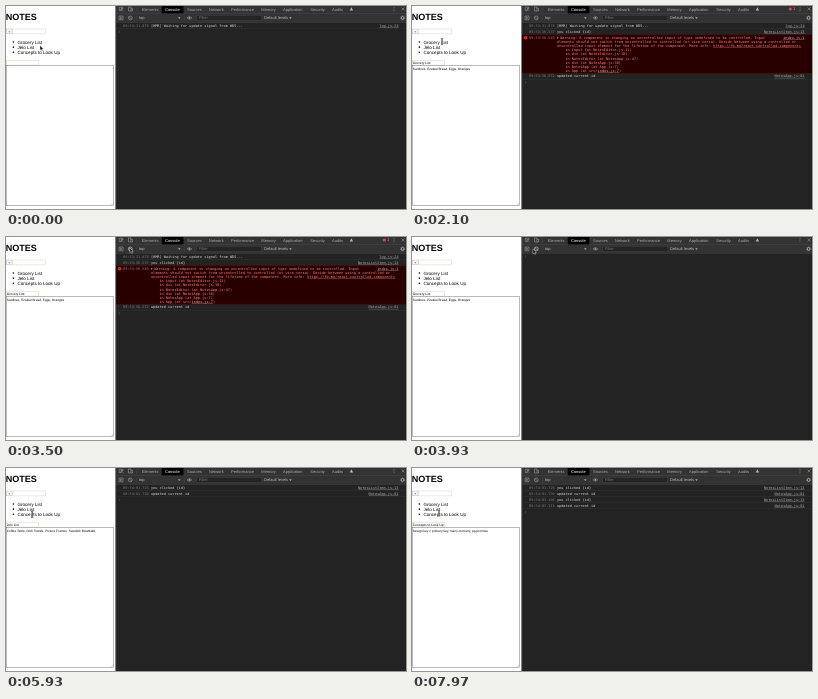
These frames come from a looping animation (400x203 px, 8 s). An HTML page:

```html
<!DOCTYPE html>
<html lang="en">
<head>
<meta charset="utf-8">
<title>Notes</title>
<style>
html, body { margin: 0; width: 100%; height: 100%; overflow: hidden; background: #fff; }
svg { display: block; width: 100vw; height: 100vh; }
text { font-family: "Liberation Sans", Arial, sans-serif; text-rendering: geometricPrecision; white-space: pre; }
.mono { font-family: "DejaVu Sans Mono", Menlo, monospace; font-size: 3.56px; }
</style>
</head>
<body>
<svg id="stage" viewBox="0 0 400 203" preserveAspectRatio="none"></svg>
<script>
const LOOP = 8000;
const CHAR = 2.143;
const stage = document.getElementById('stage');

function add(tag, attrs, parent = stage) {
  const node = document.createElementNS('http://www.w3.org/2000/svg', tag);
  for (const key in attrs) node.setAttribute(key, attrs[key]);
  parent.append(node);
  return node;
}
const group = () => add('g', {});
const rect = (x, y, width, height, fill, parent, more) =>
  add('rect', { x, y, width, height, fill, ...more }, parent);
const path = (d, stroke, parent, width = 0.5, fill = 'none') =>
  add('path', { d, stroke, fill, 'stroke-width': width }, parent);
function label(x, y, str, size, fill, parent, more) {
  const node = add('text', { x, y, 'font-size': size, fill, ...more }, parent);
  node.textContent = str;
  return node;
}
const mono = (x, y, str, fill, parent) => label(x, y, str, 3.56, fill, parent, { class: 'mono' });
function link(x, y, str, fill, parent) {
  mono(x, y, str, fill, parent);
  rect(x, y + 0.5, str.length * CHAR, 0.3, fill, parent);
}

// Notes page
const box = (x, y, w, h, stroke, fill = '#fff') =>
  rect(x, y, w, h, fill, stage, { stroke, 'stroke-width': 0.5 });

function drawPage() {
  rect(0, 0, 110, 203, '#fff');
  label(-0.3, 14.3, 'NOTES', 9.05, '#000', stage, { 'font-weight': 700 });
  box(0.3, 23, 5.8, 4.8, '#bbb', '#f6f6f6');
  label(2.2, 26.7, '+', 3.4, '#222');
  box(6.8, 23, 32.6, 4.9, '#d4d2c4');
  ['Grocery List', 'Jelo List', 'Concepts to Look Up'].forEach((item, i) => {
    const y = 37.5 + i * 5.15;
    add('circle', { cx: 7.4, cy: y - 1.5, r: 0.8, fill: '#000' });
    label(11.5, y, item, 4.55, '#000');
  });
  box(0.3, 54.2, 32, 4.9, '#d4cfb4');
  box(0.3, 59.5, 107.3, 140, '#777');
  path('M104.8 199l2.4-2.4M106.2 199l1-1', '#999', stage, 0.35);
}

// Developer tools frame
function drawTools() {
  const dim = '#a9a9a9';
  rect(110, 0, 290, 203, '#232323');
  rect(110, 0, 290, 16.4, '#333');
  rect(110, 7.4, 290, 0.5, '#464646');
  rect(110, 16.1, 290, 0.4, '#464646');
  rect(155.8, 0, 21.6, 7.4, '#000');
  const tabs = [[135.8, 'Elements'], [159, 'Console'], [181, 'Sources'], [203, 'Network'],
    [225, 'Performance'], [255.3, 'Memory'], [277, 'Application'], [304.3, 'Security'], [326, 'Audits']];
  for (const [x, name] of tabs) label(x, 4.5, name, 4, name === 'Console' ? '#fff' : dim);
  path('M115.5 4.6h-2.3v-3.3h3.8v1.4M115 2.6l2.6 2.3M115 2.6v2.2M115 2.6h2', dim);
  path('M122.5 1h2.4v4h-2.4zM125 2.3h1.5v2.7h-1.5', dim);
  rect(130.5, 1, 0.3, 5, '#505050');
  path('M345.4 1.2l1.7 3.2h-3.4z', 'none', stage, 0, '#b5b5b5');
  for (const y of [1.3, 3, 4.7]) add('circle', { cx: 388, cy: y, r: 0.45, fill: dim });
  path('M395.6 1.6l2.8 2.8m0-2.8l-2.8 2.8', dim);

  path('M113 10h4v3.8h-4zM114.4 10.8l1.5 1.1-1.5 1.1z', dim);
  rect(130.5, 9.3, 0.3, 5.4, '#505050');
  label(133, 13.3, 'top', 4, '#bbb');
  path('M172 11.2h2.6l-1.3 1.7z', 'none', stage, 0, dim);
  rect(178.4, 9.3, 0.3, 5.4, '#505050');
  path('M181 11.9q2.4-3 4.8 0q-2.4 3-4.8 0z', dim);
  add('circle', { cx: 183.4, cy: 11.9, r: 0.8, fill: dim });
  rect(190.8, 9.4, 65, 5, '#242424', stage, { stroke: '#484848', 'stroke-width': 0.4 });
  label(193, 13.3, 'Filter', 4, '#777');
  label(258, 13.3, 'Default levels', 4, '#bbb');
  path('M283.2 11.2h2.6l-1.3 1.7z', 'none', stage, 0, dim);
  add('circle', { cx: 396.6, cy: 11.9, r: 1.4, fill: 'none', stroke: dim, 'stroke-width': 1 });
  add('circle', { cx: 396.6, cy: 11.9, r: 2.2, fill: 'none', stroke: dim, 'stroke-width': 0.5, 'stroke-dasharray': '.8 .93' });
  rect(109.3, 0, 0.9, 203, '#4a4a4a');
}

// Console
const warning = [
  ' Warning: A component is changing an uncontrolled input of type undefined to be controlled. Input',
  'elements should not switch from uncontrolled to controlled (or vice versa). Decide between using a controlled or',
  'uncontrolled input element for the lifetime of the component. More info: ',
  '    in input (at NotesEditor.js:11)',
  '    in div (at NotesEditor.js:10)',
  '    in NotesEditor (at NotesApp.js:47)',
  '    in div (at NotesApp.js:36)',
  '    in NotesApp (at App.js:7)',
  '    in App (at src/'
];
const clicked = time => [time, 'you clicked {id}', 'NotesListItem.js:13'];
const updated = time => [time, 'updated current id', 'NotesApp.js:81'];
const waiting = ['09:53:31.878', '[HMR] Waiting for update signal from WDS...', 'log.js:24'];
const failed = ['09:53:56.549', warning, 'index.js:1'];
const second = [clicked('09:54:01.726'), updated('09:54:01.730')];

function drawError(y, parent) {
  const red = '#f08080';
  rect(110.2, y, 289.8, 38.5, '#290000', parent);
  rect(110.2, y, 289.8, 0.35, '#5c0000', parent);
  rect(110.2, y + 38.2, 289.8, 0.35, '#5c0000', parent);
  add('circle', { cx: 113.6, cy: y + 3.1, r: 1.7, fill: '#e8403c' }, parent);
  path(`M112.9 ${y + 2.4}l1.4 1.4m0-1.4l-1.4 1.4`, '#290000', parent, 0.45);
  path(`M145.2 ${y + 2}l1.7 1.1-1.7 1.1z`, 'none', parent, 0, '#b08080');
  warning.forEach((str, i) => mono(i ? 144.9 : 146, y + 4.2 + i * 4.14, str, red, parent));
  link(144.9 + 73 * CHAR, y + 4.2 + 2 * 4.14, 'https://fb.me/react-controlled-components', red, parent);
  const x = 144.9 + warning[8].length * CHAR, end = y + 4.2 + 8 * 4.14;
  link(x, end, 'index.js:7', '#e8b0b0', parent);
  mono(x + 10 * CHAR, end, ')', red, parent);
}

function drawLog(rows, parent) {
  let y = 16.5;
  for (const [time, message, file] of rows) {
    const error = message === warning;
    if (error) drawError(y, parent);
    else {
      mono(144.9, y + 4.2, message, '#d5d5d5', parent);
      rect(110.2, y + 5.9, 289.8, 0.3, '#3a3a3a', parent);
    }
    mono(117.1, y + 4.2, time, error ? '#a07070' : '#777', parent);
    link(392.6 - file.length * CHAR, y + 4.2, file, error ? '#d8b0b0' : '#aaa', parent);
    y += error ? 38.5 : 6.1;
  }
  path(`M112.8 ${y + 1.9}l1.3 1.2-1.3 1.2`, '#3670c8', parent, 0.5);
}

drawPage();
drawTools();

const notes = [
  [0, '', ''],
  [2030, 'Grocery List', 'Sardines, Ezekial Bread, Eggs, Oranges'],
  [5200, 'Jelo List', 'Coffee Table, Dish Towels, Picture Frames, Swedish Meatballs'],
  [6570, 'Concepts to Look Up', 'foreign key v primary key, many-to-many, pg-promise']
];
const logs = [
  [0, [waiting]],
  [2030, [waiting, clicked('09:53:56.537'), failed, updated('09:53:56.552')]],
  [3570, []],
  [5200, second],
  [6570, [...second, clicked('09:54:03.105'), updated('09:54:03.113')]]
];
const title = label(0.7, 57.9, '', 3.3, '#000');
const body = label(0.8, 63.6, '', 3.21, '#000');
const panels = logs.map(([, rows]) => {
  const g = group();
  drawLog(rows, g);
  return g;
});

const badge = group();
add('circle', { cx: 378.3, cy: 3, r: 1.6, fill: '#e8403c' }, badge);
label(381, 4.4, '1', 4, '#aaa', badge);

const clear = group();
add('circle', { cx: 124.3, cy: 11.9, r: 1.9, fill: 'none', 'stroke-width': 0.55 }, clear);
add('path', { d: 'M123 10.6l2.6 2.6', 'stroke-width': 0.55 }, clear);

// Pointer
const arrow = group();
path('M0 0v4.7l1.1-1 .8 1.8.9-.4-.8-1.7h1.4z', '#fff', arrow, 0.4, '#000');
const beam = group();
path('M-1.2-3.2q1.2 0 1.2.8v4.8q0 .8-1.2.8M1.2-3.2q-1.2 0-1.2.8v4.8q0 .8 1.2.8', '#fff', beam, 1);
path('M-1.2-3.2q1.2 0 1.2.8v4.8q0 .8-1.2.8M1.2-3.2q-1.2 0-1.2.8v4.8q0 .8 1.2.8', '#111', beam, 0.55);

const moves = [
  [0, 34, 39.5], [270, 32.6, 37.4], [1340, 32.6, 37.4], [1370, 32.2, 36.4],
  [1530, 30, 35.6], [2130, 30, 35.6], [2830, 114, 25], [3300, 123.8, 11],
  [3900, 123.8, 11], [4200, 27, 45.6], [4400, 27, 45.6], [4550, 26.6, 48.8],
  [4730, 27, 41.8], [4970, 25.2, 42.4], [5470, 25.2, 42.4], [5930, 26.2, 46.5],
  [7770, 26.2, 46.5], [7970, 27, 45.1], [8000, 27, 45.1]
];

function pointerAt(t) {
  const i = moves.findIndex(m => m[0] > t);
  const [t0, x0, y0] = moves[i - 1], [t1, x1, y1] = moves[i];
  const p = (t - t0) / (t1 - t0), e = p * p * (3 - 2 * p);
  return [x0 + (x1 - x0) * e, y0 + (y1 - y0) * e];
}
const overText = (x, y) =>
  x > 11.5 && ((x < 36 && y > 33 && y < 37.2) || (x < 31 && y > 38 && y < 48.5));
const stepAt = (table, t) => table.findLastIndex(row => row[0] <= t);
const show = (node, on) => node.setAttribute('visibility', on ? 'visible' : 'hidden');

function render(t) {
  const note = notes[stepAt(notes, t)];
  title.textContent = note[1];
  body.textContent = note[2];
  const log = stepAt(logs, t);
  panels.forEach((panel, i) => show(panel, i === log));
  show(badge, log === 1);
  clear.setAttribute('stroke', t >= 3270 && t < 3960 ? '#e8e8e8' : '#a9a9a9');

  const [x, y] = pointerAt(t);
  const text = overText(x, y);
  show(beam, text);
  show(arrow, !text);
  (text ? beam : arrow).setAttribute('transform', `translate(${x} ${y})`);
}

const start = performance.now();
function tick() {
  render((performance.now() - start) % LOOP);
  requestAnimationFrame(tick);
}
tick();
</script>
</body>
</html>
```
